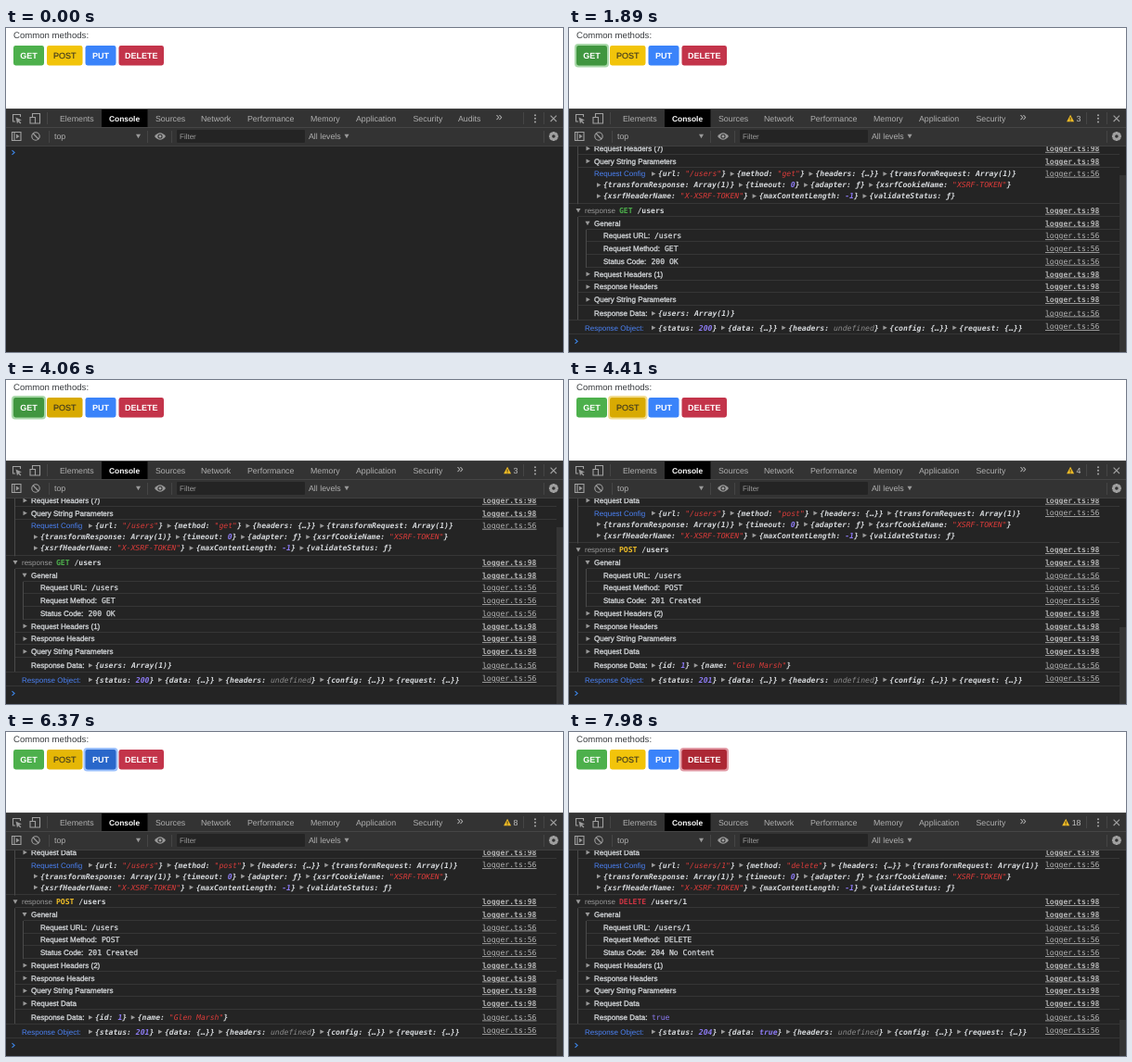
These frames come from a looping animation (600x350 px, 8 s). An HTML page:

```html
<!DOCTYPE html>
<html lang="en">
<head>
<meta charset="utf-8">
<title>Request logger</title>
<style>
html, body { margin: 0; width: 100%; height: 100%; overflow: hidden; background: #fff; }
svg { display: block; width: 600px; height: 350px; }
text {
  font: 8.8px "Liberation Sans", Arial, sans-serif;
  fill: #b0b0b0; white-space: pre; text-rendering: geometricPrecision;
}
.intro { font-size: 9.6px; fill: #3a3d40; }
.btn { font-size: 9px; font-weight: 700; fill: #fff; text-anchor: middle; }
.btn.dark { font-weight: 400; fill: #3a3520; stroke: #3a3520; stroke-width: .15; }
.on { fill: #fff; font-weight: 700; font-size: 8.4px; }
.more { font-size: 13px; }
.count { text-anchor: end; fill: #c4c4c4; }
.lbl { font-size: 8px; fill: #4b82f5; }
.soft { font-size: 8px; fill: #9a9a9a; }
.head { font-size: 8px; fill: #d6d9dc; stroke: #d6d9dc; stroke-width: .3; }
.mono, .obj, .link { font: 8.1px "DejaVu Sans Mono", Menlo, monospace; fill: #d6d9dc; }
.mono { stroke: #d6d9dc; stroke-width: .25; }
.bold { font-weight: 700; stroke: none; }
.obj { font-style: italic; font-weight: 700; }
.link { fill: #b4b4b4; text-decoration: underline; }
.str { fill: #dc3c3a; font-weight: 400; }
.num { fill: #8d7bf5; stroke: none; }
.und { fill: #8c8c8c; font-weight: 400; }
.icon { fill: none; stroke: #a0a0a0; stroke-width: 1.1; }
.tri { fill: #9a9a9a; }
.edge { fill: none; stroke: #363636; }
.guide { stroke: #4a4a4a; }
.chevron { fill: none; stroke: #3b82e0; stroke-width: 1.2; }
.ring { opacity: 0; }

.get, .post, .put, .delete, .ring { animation: 8s linear infinite; }
.get { animation-name: get; }
.post { animation-name: post; }
.put { animation-name: put; }
.delete { animation-name: delete; }
.ring.r0 { animation-name: ring0; }
.ring.r1 { animation-name: ring1; }
.ring.r2 { animation-name: ring2; }
.ring.r3 { animation-name: ring3; }
@keyframes get { 0%, 13.5%, 54.4%, 100% { fill: #4db04c } 14.8%, 52.5% { fill: #40963f } }
@keyframes post { 0%, 35.2%, 80.6%, 100% { fill: #f2c40a } 37%, 78.7% { fill: #d8aa02 } }
@keyframes put { 0%, 64.7%, 94.6%, 100% { fill: #3a83fa } 66.5%, 92.7% { fill: #2967ca } }
@keyframes delete { 0%, 89.4% { fill: #c3344a } 91.2%, 100% { fill: #ac2734 } }
@keyframes ring0 { 0%, 21.8%, 54%, 100% { opacity: 0 } 23%, 52.5% { opacity: 1 } }
@keyframes ring1 { 0%, 52.5%, 79.6%, 100% { opacity: 0 } 54%, 78.7% { opacity: 1 } }
@keyframes ring2 { 0%, 78.5%, 94%, 100% { opacity: 0 } 79.5%, 92.7% { opacity: 1 } }
@keyframes ring3 { 0%, 92.7% { opacity: 0 } 94.2%, 100% { opacity: 1 } }
</style>
</head>
<body>
<svg viewBox="0 0 600 350" xmlns="http://www.w3.org/2000/svg"></svg>
<script>
const LOOP = 8000, CHAR = 4.876, ROW = 13.75, BAR = 98.1;

const text = (x, y, s, cls = '') => `<text x="${x}" y="${y + 2.5}" class="${cls}">${s}</text>`;
const rect = (x, y, w, h, fill, extra = '') =>
  `<rect x="${x}" y="${y}" width="${w}" height="${h}" fill="${fill}" ${extra}/>`;
const path = (d, cls) => `<path d="${d}" class="${cls}"/>`;
const timed = (from, to, body) => `<g data-from="${from}" data-to="${to}">${body}</g>`;
const right = (x, y) => path(`M${x} ${y - 2.6}l4.4 2.4l-4.4 2.4z`, 'tri');
const down = (x, y) => path(`M${x} ${y - 2.2}h5l-2.5 4.4z`, 'tri');
const prompt = y => path(`M6.5 ${y - 2.4}l2.6 2.4l-2.6 2.4`, 'chevron');
const edge = (x, y) => path(`M${x} ${Math.floor(y) - .5}H593`, 'edge');
const link = (y, line) => text(513, y, 'logger.ts:' + line, line === 98 ? 'link bold' : 'link');

function kind(v) {
  if (v[0] === '"') return 'str';
  if (v === 'undefined') return 'und';
  return /^(-?\d+|true)$/.test(v) ? 'num' : '';
}

// A run of collapsed one-key objects
function objects(x, y, pairs) {
  return pairs.map(([key, value]) => {
    const out = right(x, y) +
      text(x + 7, y, `{${key}: <tspan class="${kind(value)}">${value}</tspan>}`, 'obj');
    x += 11.6 + (key.length + value.length + 4) * CHAR;
    return out;
  }).join('');
}

function page() {
  const buttons = [
    ['GET', 8, 33, '#a9d8a9'], ['POST', 44, 38.5, '#f3dd90'],
    ['PUT', 85.5, 33, '#9cc1fc'], ['DELETE', 121.5, 48.5, '#e19aa5']
  ];
  return rect(0, 0, 600, 88, '#fff') + text(8, 8, 'Common methods:', 'intro') +
    buttons.map(([name, x, w, glow], i) =>
      rect(x - 2, 17, w + 4, 25.5, glow, `rx="4" class="ring r${i}"`) +
      rect(x, 19, w, 21.5, '#000', `rx="2.4" class="${name.toLowerCase()}"`) +
      text(x + w / 2, 30.1, name, i === 1 ? 'btn dark' : 'btn')).join('');
}

function toolbar() {
  const tabs = [['Elements', 58], ['Sources', 161], ['Network', 210], ['Performance', 260],
    ['Memory', 328], ['Application', 377], ['Security', 438.5]];
  const bars = rect(0, 87, 600, 40, '#333') + rect(0, 87, 600, 1, '#454545') +
    rect(0, 107, 600, 1, '#454545') + rect(0, 127, 600, 1, '#404040') +
    rect(103, 88, 49.5, 19, '#000') + rect(184, 110, 138, 14, '#242424', 'rx="1"') +
    timed(980, 1260, rect(23, 109.5, 17, 15.5, '#444'));
  const dividers = [[44, 91], [557, 91], [579, 91], [46, 111], [152, 111], [178, 111], [579, 111]]
    .map(([x, y]) => rect(x, y, 1, 13, '#454545')).join('');
  const teeth = [0, 45, 90, 135].map(a =>
    rect(588.4, 112, 3, 10, '#a0a0a0', `transform="rotate(${a} 589.9 117)"`)).join('');
  const icons =
    path('M10 101H7.5V93.5H15.5V96', 'icon') + path('M10.5 96.5l6.5 3l-2.8 .8l2.2 2.2l-1 1l-2.2-2.3l-1.2 2.3z', 'tri') +
    path('M28.5 96V92.5H36.5V103H32M26 96.5H31.5V103H26z', 'icon') +
    path('M6.5 112.5H16V121.5H6.5zM9 112.5V121.5', 'icon') + path('M11 114.6l3.6 2.4l-3.6 2.4z', 'tri') +
    '<circle cx="32" cy="117" r="4.2" class="icon"/>' + path('M29.2 114l5.8 6', 'icon') +
    path('M160 117Q166 109.5 172 117Q166 124.5 160 117z', 'tri') +
    '<circle cx="166" cy="117" r="2.6" fill="#333"/><circle cx="166" cy="117" r="1.5" fill="#a0a0a0"/>' +
    teeth + '<circle cx="589.9" cy="117" r="4" fill="#a0a0a0"/><circle cx="589.9" cy="117" r="1.8" fill="#333"/>' +
    [94.2, 97.8, 101.4].map(y => `<circle cx="570" cy="${y}" r="1" fill="#a9a9a9"/>`).join('') +
    path('M586.6 94.6l6.4 6.4m0-6.4l-6.4 6.4', 'icon');
  const labels = tabs.map(([s, x]) => text(x, BAR, s)).join('') +
    text(111, BAR, 'Console', 'on') + text(52, 117.4, 'top') + down(140, 117) +
    text(187, 117.4, 'Filter', 'soft') + text(326, 117.4, 'All levels') + down(364.5, 117);
  return bars + dividers + icons + labels +
    timed(0, 1820, text(487, BAR, 'Audits') + text(527.5, 97.4, '»', 'more')) +
    timed(1820, LOOP, text(485.5, 97.4, '»', 'more'));
}

function warnings() {
  const steps = [[1820, 3], [4400, 4], [4480, 8], [6440, 9], [6510, 13], [7560, 14], [7630, 18]];
  return steps.map(([from, n], i) => {
    const x = 545 - String(n).length * 4.9;
    return timed(from, i + 1 < steps.length ? steps[i + 1][0] : LOOP,
      `<path d="M${x - 4} 101.2l4-7.4l4 7.4z" fill="#eebb27"/>` +
      rect(x - .5, 96.4, 1, 2.5, '#4a3a10') + rect(x - .5, 99.5, 1, 1, '#4a3a10') +
      text(551.5, BAR, n, 'count'));
  }).join('');
}

// One exchange, laid out upwards from the prompt
function exchange({ from, to, method, url, color, status, sent, data, thumb }) {
  const body = method !== 'GET';
  const tail = [`Request Headers (${sent})`, 'Response Headers', 'Query String Parameters'];
  if (body) tail.push('Request Data');
  const facts = [['Request URL:', url, 92], ['Request Method:', method, 103], ['Status Code:', status, 88.5]];
  const code = status.slice(0, 3);
  let y = 293.5 - (tail.length - 1) * ROW;
  const folded = (s, at) => right(18.5, at) + text(27, at, s, 'head') + link(at, 98) + edge(10, at + 7);

  let out = tail.map((s, i) => folded(s, y + i * ROW)).join('');
  const factEnd = y - 7;
  y -= facts.length * ROW;
  out += facts.map(([label, value, x], i) => {
    const at = y + i * ROW;
    return text(37, at, label, 'head') + text(x, at, value, 'mono') + link(at, 56) + edge(19, at + 7);
  }).join('') + path(`M18.5 ${y - 7}V${factEnd}`, 'guide');

  y -= ROW;
  out += down(17.5, y) + text(27, y, 'General', 'head') + link(y, 98) + edge(19, y + 7) +
    path(`M9.5 ${y - 7}V316`, 'guide');
  y -= ROW;
  out += down(7.5, y) + text(17, y, 'response', 'soft') +
    text(54, y, `<tspan fill="${color}">${method}</tspan> ${url}`, 'mono bold') +
    link(y, 98) + edge(0, y - 7) + edge(10, y + 7) + path(`M9.5 127V${y - 7}`, 'guide');

  const line = y - 39.5;
  out += text(27, line, 'Request Config', 'lbl') + link(line - .5, 56) +
    objects(89, line, [['url', `"${url}"`], ['method', `"${method.toLowerCase()}"`],
      ['headers', '{…}'], ['transformRequest', 'Array(1)']]) +
    objects(30, line + 12, [['transformResponse', 'Array(1)'], ['timeout', '0'],
      ['adapter', 'ƒ'], ['xsrfCookieName', '"XSRF-TOKEN"']]) +
    objects(30, line + 24, [['xsrfHeaderName', '"X-XSRF-TOKEN"'],
      ['maxContentLength', '-1'], ['validateStatus', 'ƒ']]);
  out += body ? folded('Request Data', line - 13.7)
    : folded('Query String Parameters', line - 13.7) + folded('Request Headers (7)', line - 27.4);

  out += text(27, 308.5, 'Response Data:', 'head') + link(308, 56) + edge(0, 316) +
    (data === true ? text(89, 308.5, '<tspan class="num">true</tspan>', 'mono') : objects(89, 308.5, data));
  out += text(17, 324, 'Response Object:', 'lbl') + link(322.7, 56) + edge(0, 331) +
    objects(89, 324, [['status', code], ['data', data === true ? 'true' : '{…}'],
      ['headers', 'undefined'], ['config', '{…}'], ['request', '{…}']]);
  return timed(from, to, out + prompt(338.5) + rect(593, thumb, 7, 350 - thumb, '#343434'));
}

const logs = [
  { from: 1820, to: 4400, method: 'GET', url: '/users', color: '#4db04c', status: '200 OK',
    sent: 1, data: [['users', 'Array(1)']], thumb: 159 },
  { from: 4400, to: 6440, method: 'POST', url: '/users', color: '#f2c028', status: '201 Created',
    sent: 2, data: [['id', '1'], ['name', '"Glen Marsh"']], thumb: 267 },
  { from: 6440, to: 7560, method: 'PUT', url: '/users/1', color: '#3a83fa', status: '202 Accepted',
    sent: 2, data: [['name', '"Marsh Glen"']], thumb: 297 },
  { from: 7560, to: LOOP, method: 'DELETE', url: '/users/1', color: '#cf3544', status: '204 No Content',
    sent: 1, data: true, thumb: 311 }
];

const stage = document.querySelector('svg');
stage.innerHTML = rect(0, 87, 600, 263, '#242424') + timed(0, 1820, prompt(134.5)) +
  logs.map(exchange).join('') + page() + toolbar() + warnings();

const parts = [...stage.querySelectorAll('[data-from]')];
function draw() {
  const t = performance.now() % LOOP;
  for (const g of parts) {
    const shown = t >= +g.dataset.from && t < +g.dataset.to;
    g.style.visibility = shown ? 'visible' : 'hidden';
  }
  requestAnimationFrame(draw);
}
draw();
</script>
</body>
</html>
```
